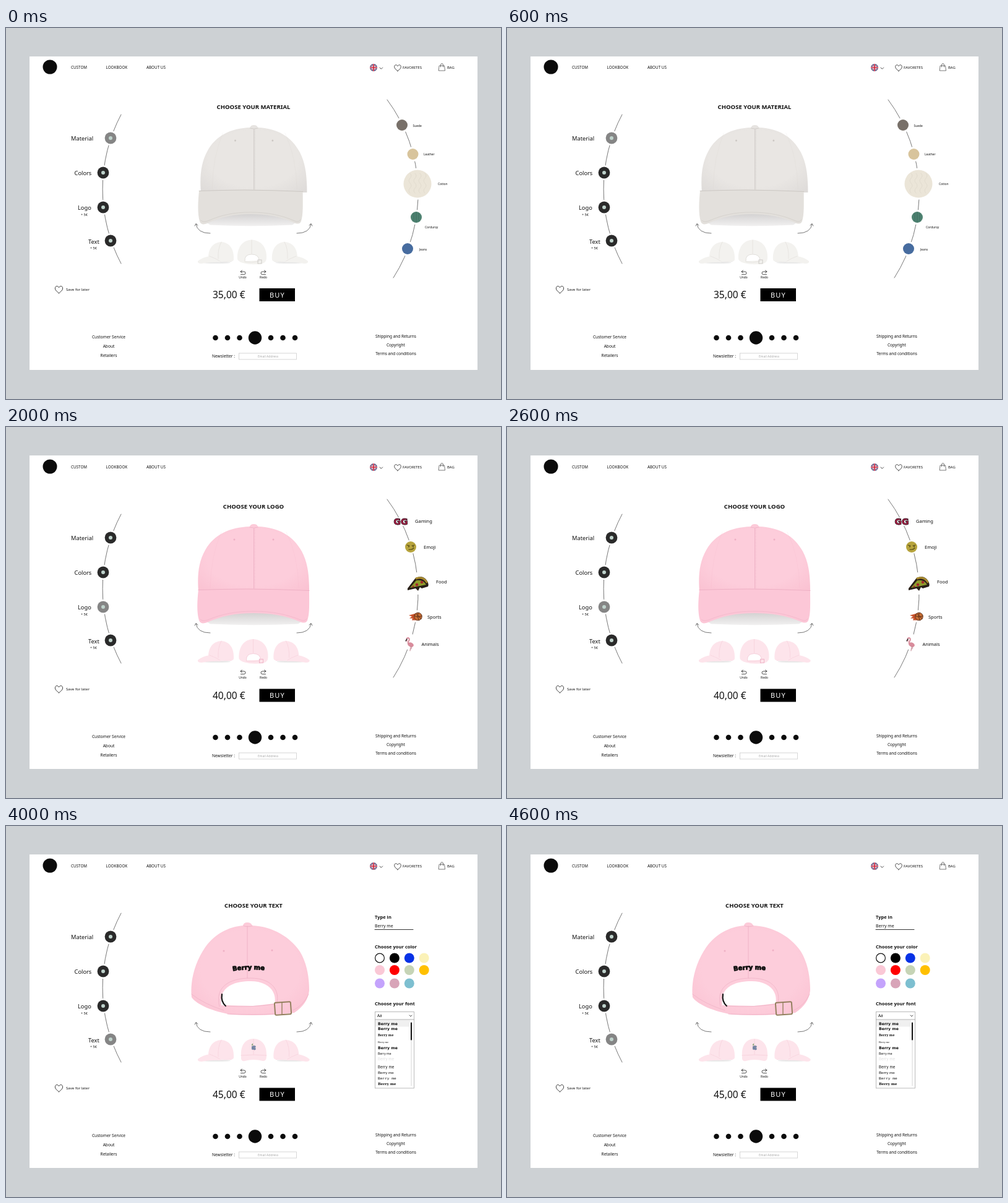
An HTML page for the animation above (5000 ms loop, 800 by 600 pixels).

```html
<!DOCTYPE html>
<html lang="en">
<head>
<meta charset="utf-8">
<title>Cap configurator</title>
<style>
  html, body { margin: 0; width: 100%; height: 100%; overflow: hidden; background: #cdd1d4; }
  svg { display: block; width: 800px; height: 600px; }
  text { font-family: "Noto Sans", "Open Sans", sans-serif; font-weight: 500; fill: #111; }
</style>
</head>
<body>
<svg id="stage" viewBox="0 0 800 600"></svg>
<script>
const STEP = 1000;
const stage = document.getElementById('stage');

// Drawing helpers: y of a label is the middle of its capitals.
const label = (x, y, size, str, extra = '') =>
  `<text x="${x}" y="${y + size * 0.36}" font-size="${size}" ${extra}>${str}</text>`;
const MID = 'text-anchor="middle"', BOLD = 'style="font-weight:700"';
const dot = (x, y, r, fill, extra = '') => `<circle cx="${x}" cy="${y}" r="${r}" fill="${fill}" ${extra}/>`;
const oval = (x, y, rx, ry, fill, turn = 0) =>
  `<ellipse cx="${x}" cy="${y}" rx="${rx}" ry="${ry}" fill="${fill}" transform="rotate(${turn} ${x} ${y})"/>`;
const rect = (x, y, w, h, fill, extra = '') =>
  `<rect x="${x}" y="${y}" width="${w}" height="${h}" fill="${fill}" ${extra}/>`;
const shape = (d, fill, extra = '') => `<path d="${d}" fill="${fill}" ${extra}/>`;
const line = (d, stroke = '#222', width = 0.8, extra = '') =>
  `<path d="${d}" fill="none" stroke="${stroke}" stroke-width="${width}" stroke-linecap="round" ${extra}/>`;
const group = (transform, body, extra = '') => `<g transform="${transform}" ${extra}>${body}</g>`;
const at = (x, y, body, scale = 1, extra = '') => group(`translate(${x} ${y}) scale(${scale})`, body, extra);
const mirror = (axis, body) => group(`translate(${2 * axis} 0) scale(-1 1)`, body);

const PINK = { main: '#fdcddb', edge: '#fac1d1', brim: '#fcc7d7', line: '#eeb0c4', thumb: '#fde4eb', fold: '#f6d0db' };
const WHITE = { main: '#e9e6e3', edge: '#dddad8', brim: '#e3e0dc', line: '#cbc7c3', thumb: '#f3f2ef', fold: '#e2e0dc' };

const shade = (id, p) => `<radialGradient id="${id}" cx=".5" cy=".5" r=".7">
  <stop offset=".6" stop-color="${p.main}"/><stop offset="1" stop-color="${p.edge}"/></radialGradient>`;
const defs = `<defs>${shade('pink', PINK)}${shade('white', WHITE)}
  <linearGradient id="under" x2="0" y2="1"><stop offset="0" stop-color="#d3d1d1"/><stop offset="1" stop-color="#f1f0f0"/></linearGradient>
  <clipPath id="round"><circle r="6"/></clipPath>
  <path id="bend" d="M366.500 234.500Q393 230 421 233.500"/></defs>`;

// Caps
function frontCap(p, fill, fitCrown = '', fitBrim = '') {
  const crown = shape('M394 161Q395 157 400.500 157T407 161C440 162 464 176 478 201C488 220 490 240 490 266L311 266C309 240 311 218 322 199C336 174 362 162 394 161Z', fill)
    + line('M394 162Q400.500 164.500 407 162', p.line)
    + line('M400.500 164V262', p.line, 0.9) + line('M402 164V262', p.line, 0.5, 'stroke-dasharray="1 1.500"')
    + line('M348 170Q331 208 330 260M453 170Q472 208 473 260', p.line, 0.5, 'opacity=".3"')
    + dot(369, 182, 1.5, p.line) + dot(432, 182, 1.5, p.line);
  const brim = shape('M320 312Q400 288 482 312L472 318.500Q400 322 330 318.500Z', 'url(#under)')
    + shape('M311 263Q400 259 490 264C490 285 491 302 487 313Q484 319 475 315C450 304 425 301 400 301C370 301 348 306 325 316Q315 320 312 313C308 300 309 280 311 263Z', p.brim)
    + line('M311 263.500Q400 260 490 264.500', p.line, 1.1)
    + line('M314 311Q317 315 326 312C350 302 372 298 400 298C430 298 454 303 476 312Q483 315 486 310', p.line, 0.6);
  return group(fitCrown, crown) + group(fitBrim, brim);
}

function backCap(p) {
  return shape('M383 161Q384 156 390 156T398 161C430 162 460 180 475 203C487 223 490 246 490 266Q488 287 466 302Q420 308 364 305C335 300 308 289 300 277C297 250 306 219 322 196C338 174 360 163 383 161Z', 'url(#pink)')
    + shape('M348 290C344 263 364 251 395 251C426 251 438 270 434 287L400 291L357 290Z', '#fff')
    + line('M349 272Q347 284 355 291', '#161616', 2.2)
    + line('M345 292C337 261 360 246 395 246C432 246 442 268 438 285', p.line, 0.7)
    + line('M390 162V246', p.line, 0.9) + line('M384 161.500Q390 164 398 161.500', p.line)
    + line('M356 291Q395 294 434 288M358 304Q400 306 434 304', p.line)
    + line('M300 272Q320 288 352 298M464 298Q481 290 489 272', p.line, 0.7)
    + dot(352, 202, 1.5, p.line) + dot(430, 201, 1.5, p.line)
    + rect(434.5, 285, 26, 20, 'none', 'rx="2" stroke="#94805f" stroke-width="2" transform="rotate(-4 447 295)"')
    + line('M446 286V305', '#94805f', 1.4)
    + `<text font-size="10" style="font-family:'DejaVu Sans',sans-serif;font-weight:700" stroke="#111" stroke-width=".9"><textPath href="#bend">Berry me</textPath></text>`;
}

const sideThumb = p =>
  oval(340, 379.5, 23, 1.3, '#e6e6e6')
  + shape('M327 372C327 355 336 346.500 348 346C361 347 369 357 368 375Q367 378 362 377.500L334 377Z', p.thumb)
  + shape('M329 369Q317 371 310 377Q309 381 316 381Q334 378 347 379Q340 371 329 369Z', p.thumb)
  + line('M329 369Q340 373 347 378L364 377.500M348 346Q342 357 343 373', p.fold, 0.7);

const backThumb = p =>
  shape('M374 374C373 354 383 343 397 342.500C412 343 422 355 421 372Q421 379 414 381Q397 384 383 380Q376 378 374 374Z', p.thumb)
  + shape('M386 377Q386 366 397 366T409 376Z', '#fff')
  + line('M386 377Q385 366 397 366T409 376', p.fold, 1)
  + line('M386 378Q397 380 409 377.500M397 343V365', p.fold, 0.8)
  + rect(407, 375, 6, 6, 'none', `stroke="${p.line}" stroke-width=".9"`);

const frontThumb = () =>
  shape('M380 372C379 354 387 344.500 400 344C413 344.500 422 354 421 372Q421 381 415 380Q400 376 386 380Q379 382 380 372Z', PINK.thumb)
  + line('M380 371Q400 369 421 371M400 345V369', PINK.fold) + at(400, 357, berries(), 0.25, 'opacity=".65"');

// Embroidered motifs, each centred on its own origin
const berries = () =>
  line('M-8 -14Q0 -8 -3 0M-4 -10Q5 -8 8 -3', '#3e7436', 1.8)
  + shape('M-13 -10Q-12 -20 -3 -22Q-2 -11 -10 -8Z', '#4d8a3c') + line('M-11 -10L-5 -19', '#24502a', 0.8)
  + [[-5, 2], [7, 0], [-5, 12], [7, 14]].map(([x, y]) =>
    dot(x, y, 7, '#1f4d7d', 'stroke="#132f55"') + dot(x - 1, y - 1, 1.8, '#86aecb') + dot(x - 1, y - 1, 0.8, '#132f55')).join('');

const taco = () => shape('M-11 5Q-8 -7 2 -6Q11 -4 11 5Z', '#8b6a32') + shape('M-11 6Q-9 -4 -1 -4Q8 -2 9 5Z', '#d9b36c')
  + line('M-9 0Q-4 -7 4 -5T10 3', '#4c7a39', 1.3);
const lemon = () => oval(-1, 2, 9, 7, '#d8d238', -35) + dot(7, -4, 2, '#d8d238')
  + shape('M4 -6Q4 -11 9 -12Q10 -6 5 -5Z', '#245f3e') + line('M-6 4Q-3 -3 3 -4', '#f2eda0', 1.2);
const cupcake = () => shape('M-8 0H8L5 11H-5Z', '#20807e') + line('M-4 2L-3 10M0 2V10M4 2L3 10', '#0f4c52')
  + shape('M-9 1Q-9 -4 -5 -5Q-4 -9 0 -10Q5 -9 5 -5Q10 -3 9 1Q0 4 -9 1Z', '#d88ba8')
  + dot(0, -10, 1.5, '#b92b42') + line('M-6 -1L-3 -2M2 -4L4 -3', '#fff', 1);
const ham = () => shape('M-9 -3Q-2 -9 6 -7Q10 -3 10 5L-9 6Z', '#82364f', 'stroke="#2b1820"')
  + oval(-5, 1, 5, 5, '#e7a0b4') + dot(-5, 1, 1.7, '#fff') + line('M-11 6H11', '#2b1820', 1.6);
const beer = () => rect(-6, -6, 13, 17, '#e09c24', 'stroke="#191510" stroke-width="2"')
  + line('M-7 -3H-10V6H-7', '#191510', 2) + line('M-2 -1V8M3 -1V8', '#191510', 1.8)
  + shape('M-9 -5Q-10 -10 -4 -10Q0 -14 4 -10Q10 -10 8 -4Q0 -2 -9 -5Z', '#f4ead1', 'stroke="#191510" stroke-width="1.500"');
const chili = () => shape('M4 -7Q10 -8 9 -2Q6 8 -11 11Q-3 3 -1 -2Q1 -6 4 -7Z', '#b2213b')
  + line('M7 -7Q8 -10 10 -11', '#356939', 2) + line('M4 -4Q3 2 -3 6', '#e0718b');
const cucumber = () => oval(0, 0, 11.5, 6, '#2f7738', 25) + line('M-7 -4L6 2M-5 0L6 5', '#63a957', 1.2, 'stroke-dasharray="1 2"');
const drink = () => line('M1 -6L3 -11L7 -11', '#cf4050', 1.5) + shape('M-6 -6H6L4 11H-4Z', '#d9d07a')
  + line('M-6 -6H6', '#b0a94c', 1.3) + rect(-3, 0, 4, 4, '#f0ebb8');
const broccoli = () => shape('M-2 1L-3 11H4L4 4L8 1Z', '#5c9b48')
  + [[-7, -2, 4], [-3, -6, 5], [4, -6, 5], [8, -1, 4], [1, -1, 4]].map(([x, y, r]) => dot(x, y, r, '#277a3d')).join('')
  + line('M-6 -4H-4M2 -7H4M6 -2H8', '#16502b', 1);
const peanut = () => group('rotate(-42)', oval(-6, 0, 7, 6, '#a87445') + oval(6, 0, 7, 6, '#a87445')
  + line('M-10 -2H11M-10 2H11M-6 -5V5M-1 -4V4M5 -5V5M9 -3V3', '#674224', 0.7));
const pizza = (crust, cheese) => shape('M-17 8L-4 -9Q8 -14 14 -5Q18 0 16 5L6 8L3 6L0 12L-4 8L-17 11Z', '#281f18')
  + shape('M-13 7L-3 -5Q8 -7 13 2L3 4Z', cheese) + line('M-3 -8Q8 -12 14 -2', crust, 3)
  + dot(-2, 2, 2.3, '#a3292d') + dot(6, -2, 2.3, '#a3292d') + dot(-8, 5, 1.5, '#a3292d');
const emoji = () => dot(0, 0, 9, '#b7a43d') + line('M-6 -3L-2 -2M2 -2L6 -3M-3 4Q2 5 5 2', '#4d4313', 1.1)
  + dot(-3, -0.5, 1, '#4d4313') + dot(4, -0.5, 1, '#4d4313');
const ball = () => shape('M3 -6Q-3 -4 -11 -2L-6 0L-10 3L-5 3L-6 6L3 6Z', '#c8532c')
  + dot(4, 0, 6.3, '#c46d34', 'stroke="#4c2415" stroke-width=".8"')
  + line('M-2 -1Q4 2 10 -1M4 -6Q2 0 5 6M0 -5Q5 -1 9 4', '#4c2415');
const flamingo = () => line('M-4 -5Q-6 -10 -2 -10Q1 -9 -1 -5Q-4 -1 0 1', '#d98c9c', 2)
  + oval(2, 1, 5, 3.5, '#d98c9c', 20) + line('M-4 -8L-6 -5', '#333', 1.4) + line('M2 4L1 11M4 4L3 8', '#b9717f', 0.9);

// Icons
const heart = w => line('M0 5C-3 2.500 -5.300 1 -5.300 -1.800C-5.300 -5.300 -1.500 -5.800 0 -2.800C1.500 -5.800 5.300 -5.300 5.300 -1.800C5.300 1 3 2.500 0 5Z', '#111', w);
const flag = () => `<g clip-path="url(#round)">${rect(-6, -6, 12, 12, '#23346f')}`
  + line('M-6 -6L6 6M6 -6L-6 6', '#fff', 1.5) + line('M-6 -6L6 6M6 -6L-6 6', '#d0243b', 0.7)
  + line('M0 -6V6M-6 0H6', '#fff', 2.8) + line('M0 -6V6M-6 0H6', '#d0243b', 1.7) + '</g>';
const turnArrow = line('M330 332Q309 332 307 317M305 320L307 316.500L310 319', '#555', 0.8);
const undoArrow = line('M379 394H384.500Q387 394 387 396.300T384.500 398.700H379.500M381.500 392L379 394L381.500 396', '#222', 0.8);

const LEFT_STOPS = [['Material', 105, 169, 178], ['Colors', 110.5, 157, 234], ['Logo', 116, 157, 290], ['Text', 133, 169, 344]];

function leftMenu(active) {
  return line('M186 140A257 257 0 0 0 186 381', '#555', 0.8)
    + LEFT_STOPS.map(([name, tx, x, y], i) => dot(x, y, 12, '#fff')
      + dot(x, y, 9.4, i === active ? '#858585' : '#2a2a2a') + dot(x, y, 3, '#bed2cb')
      + label(tx, y + (i === 3 ? 2 : 0.5), 9.3, name)).join('')
    + label(121, 302, 5.5, '+ 5€') + label(136, 356.500, 5.5, '+ 5€');
}

function page(active, title, price, low) {
  const header = dot(71, 63, 11.5, '#0b0b0b')
    + label(105, 63.3, 6.3, 'CUSTOM') + label(161.5, 63.3, 6.3, 'LOOKBOOK') + label(227, 63.3, 6.3, 'ABOUT US')
    + at(594, 64, flag()) + line('M604 64L606.300 66.300L608.600 64', '#222', 0.8)
    + at(633, 64.500, heart(0.75)) + label(641, 64.3, 6.1, 'FAVORITES')
    + line('M700.500 61H708.500L709.500 69H699.500ZM702.500 63V60Q702.500 57.500 704.500 57.500T706.500 60V63', '#333', 0.65)
    + label(713, 64.3, 5.9, 'BAG');
  const footer = [['Customer Service', 499.7], ['About', 514.7], ['Retailers', 529.4]]
    .map(([s, y]) => label(166, y, 6.6, s, MID)).join('')
    + [['Shipping and Returns', 498.8], ['Copyright', 512.6], ['Terms and conditions', 526.2]]
      .map(([s, y]) => label(630, y, 6.5, s, MID)).join('')
    + [338.5, 358, 377.5, 428, 447.5, 467].map(x => dot(x, 501, 4.3, '#0b0b0b')).join('')
    + dot(402.500, 501, 10.7, '#0b0b0b')
    + label(333, 530.3, 6.6, 'Newsletter :')
    + rect(376.5, 526, 93, 10, '#fff', 'stroke="#ccc" stroke-width=".8"')
    + label(423.500, 531, 5, 'Email Address', MID + ' style="fill:#aaa;font-weight:400"');
  const body = header + footer + leftMenu(active)
    + label(400, 127.700, 9.55, title, MID + ' ' + BOLD)
    + turnArrow + mirror(400, turnArrow) + undoArrow + mirror(399.500, undoArrow)
    + at(85.500, 423, heart(0.7), 1.15) + label(97, 422.700, 6.1, 'Save for later');
  return rect(38, 46, 724, 507, '#fff') + at(0, low, body)
    + at(0, low * 2, label(382.500, 403, 4.9, 'Undo', MID) + label(416, 403, 4.9, 'Redo', MID))
    + at(0, low * 2.5, label(334, 431.500, 15.5, price + ',00 €')
      + rect(409.500, 421, 57.500, 21, '#000')
      + label(426, 432, 11, 'BUY', 'letter-spacing="1.200" style="fill:#fff"'));
}

const thumbs = (p, middle, gap = 0) =>
  sideThumb(p) + middle + at(gap, 0, mirror(399, sideThumb(p)));
const pinkThumbs = middle => thumbs(PINK, middle, 2.5);
const pinkBack = at(2.500, 0.5, backThumb(PINK));
const rightArc = line('M616 116A253 253 0 0 1 626 404', '#555', 0.8);
const bead = (x, y, r, color) => dot(x, y, r + 3, '#fff') + dot(x, y, r, color);
const rows = (list, size) => list.map(([s, x, y]) => label(x, y, size, s)).join('');

function materials() {
  const knit = [-12, -4, 4, 12].map(x =>
    line(`M${x} -17q4 4 0 8t0 8t0 8t0 8`, '#e2dccf', 1)).join('');
  return rightArc + bead(640, 157, 9, '#787069') + bead(657.500, 204, 9, '#d8c49c')
    + bead(665, 252, 22.5, '#ebe5d8') + at(665, 252, knit)
    + bead(663, 306, 9, '#4d8170') + line('M659 300V312M663 298V314M667 300V312', '#3c6c5d', 0.7)
    + bead(649, 357, 9, '#476c9f')
    + rows([['Suede', 657.5, 158], ['Leather', 675, 204], ['Cotton', 698, 252], ['Corduroy', 677, 322.5], ['Jeans', 668, 358.5]], 4.9);
}

function colors() {
  return rightArc + bead(640, 157, 9, '#fbf2b8') + bead(657.500, 204, 9, '#c4a3fc') + bead(666, 252, 22.5, '#fac8d6')
    + bead(663, 306, 9, '#7dc0c5') + bead(652, 352, 9, '#c6d4b6')
    + dot(574, 244.500, 4.5, '#000') + dot(574, 259.500, 4, '#fff', 'stroke="#000" stroke-width="1.400"')
    + rows([['Monocolored', 585, 245], ['Multicolored', 585, 260]], 6.4);
}

function logos() {
  const gaps = [[640, 152, 8], [654, 194, 11], [666, 253, 18], [663, 306, 10], [654, 348, 13]];
  return at(0, 1, rightArc) + gaps.map(([x, y, r]) => dot(x, y, r, '#fff')).join('')
    + label(638, 152.500, 14, 'GG', MID + ` style="font-family:'DejaVu Sans',sans-serif;font-weight:700;fill:#c51f4c" stroke="#351522" stroke-width="1"`)
    + at(654, 194, emoji()) + at(666, 253, pizza('#a88a2e', '#8f9c2c')) + at(662, 306.500, ball()) + at(652, 351, flamingo())
    + rows([['Gaming', 661, 152], ['Emoji', 675, 194.5], ['Food', 695, 250.5], ['Sports', 681, 307], ['Animals', 671.5, 351]], 7.5);
}

function foods() {
  const items = [[taco(), lemon()], [cupcake(), ham()], [beer(), chili()],
    [at(0, 0, berries(), 0.5, 'opacity=".35"'), cucumber()], [drink(), broccoli()],
    [at(0, 1, pizza('#b47b22', '#e4ac2e'), 0.64), peanut()]];
  return shape('M595 141.500L601 138V145Z', '#000') + label(606, 141.500, 6.9, 'Go back')
    + items.map((pair, r) => at(606, 175 + r * 36.7, pair[0]) + at(656, 175 + r * 36.7, pair[1])).join('')
    + line('M622 390L618 394.500L622 399M639.500 390L643.500 394.500L639.500 399', '#111', 1.5);
}

function textPanel() {
  const swatches = ['#fff', '#000', '#0732e6', '#fbf2b8', '#fac8d6', '#f00', '#c6d4b6', '#ffc000', '#c4a3fc', '#d8a4b8', '#7dbfd0'];
  const fonts = [[320, 6.2, 'DejaVu Sans', 700], [328, 6.2, 'DejaVu Sans', 700], [338, 5.4, 'Noto Serif', 700], [349, 4.6, 'Liberation Serif', 400],
    [358.5, 6.2, 'DejaVu Sans', 700], [368, 5, 'Noto Sans', 400], [377, 6, 'Inter', 400, '#ddd'], [389.5, 6.1, 'Inter', 400],
    [399, 6.4, 'Lato', 400], [407.5, 6.2, 'Liberation Mono', 400], [417, 5.7, 'DejaVu Serif', 700]];
  return label(596, 147.500, 7.5, 'Type in', BOLD) + label(596, 162, 6.9, 'Berry me') + line('M596 167.500H658', '#222', 0.9)
    + label(596, 195, 7.6, 'Choose your color', BOLD)
    + swatches.map((c, i) => dot(604 + i % 4 * 23.9, [213.5, 233, 254.5][i >> 2], i ? 8 : 7.4, c, i ? '' : 'stroke="#111" stroke-width="1.200"')).join('')
    + label(596, 287, 7.6, 'Choose your font', BOLD)
    + rect(596.5, 300.5, 63, 123.5, '#fff', 'stroke="#aaa" stroke-width=".8"')
    + rect(597, 314, 56, 10.5, '#f0f0f0') + line('M596.500 313H659.500', '#999', 0.8)
    + label(600, 306.500, 6.4, 'Aa') + line('M652 306L654 308L656 306', '#222', 0.8)
    + line('M655 318V420', '#ccc', 0.8) + line('M655 318.500V345.500', '#111', 2)
    + fonts.map(([y, size, family, weight, color = '#111']) =>
      label(601, y, size, 'Berry me', `style="font-family:'${family}',sans-serif;font-weight:${weight};fill:${color}"`)).join('');
}

const pinkFront = frontCap(PINK, 'url(#pink)');
const scenes = [
  page(0, 'CHOOSE YOUR MATERIAL', 35, 0) + materials() + thumbs(WHITE, backThumb(WHITE))
    + frontCap(WHITE, 'url(#white)', 'translate(17 0) scale(.958 1)', 'translate(21 0) scale(.936 1)'),
  page(1, 'CHOOSE YOUR COLOR', 35, 0) + colors() + pinkThumbs(pinkBack) + pinkFront,
  page(2, 'CHOOSE YOUR LOGO', 40, 1) + logos() + pinkThumbs(pinkBack) + pinkFront,
  page(2, 'CHOOSE YOUR LOGO', 40, 1) + foods() + pinkThumbs(pinkBack) + pinkFront + at(401, 225, berries()),
  page(3, 'CHOOSE YOUR TEXT', 45, 1) + textPanel() + pinkThumbs(frontThumb()) + backCap(PINK)
];

stage.innerHTML = defs + scenes.map(s => `<g class="scene" visibility="hidden">${s}</g>`).join('');
const layers = [...stage.querySelectorAll('.scene')];

function draw(time) {
  const current = Math.floor(time / STEP) % layers.length;
  layers.forEach((g, i) => g.setAttribute('visibility', i === current ? 'visible' : 'hidden'));
}

const start = performance.now();
function tick() {
  draw(performance.now() - start);
  requestAnimationFrame(tick);
}
draw(0);
requestAnimationFrame(tick);
</script>
</body>
</html>
```
